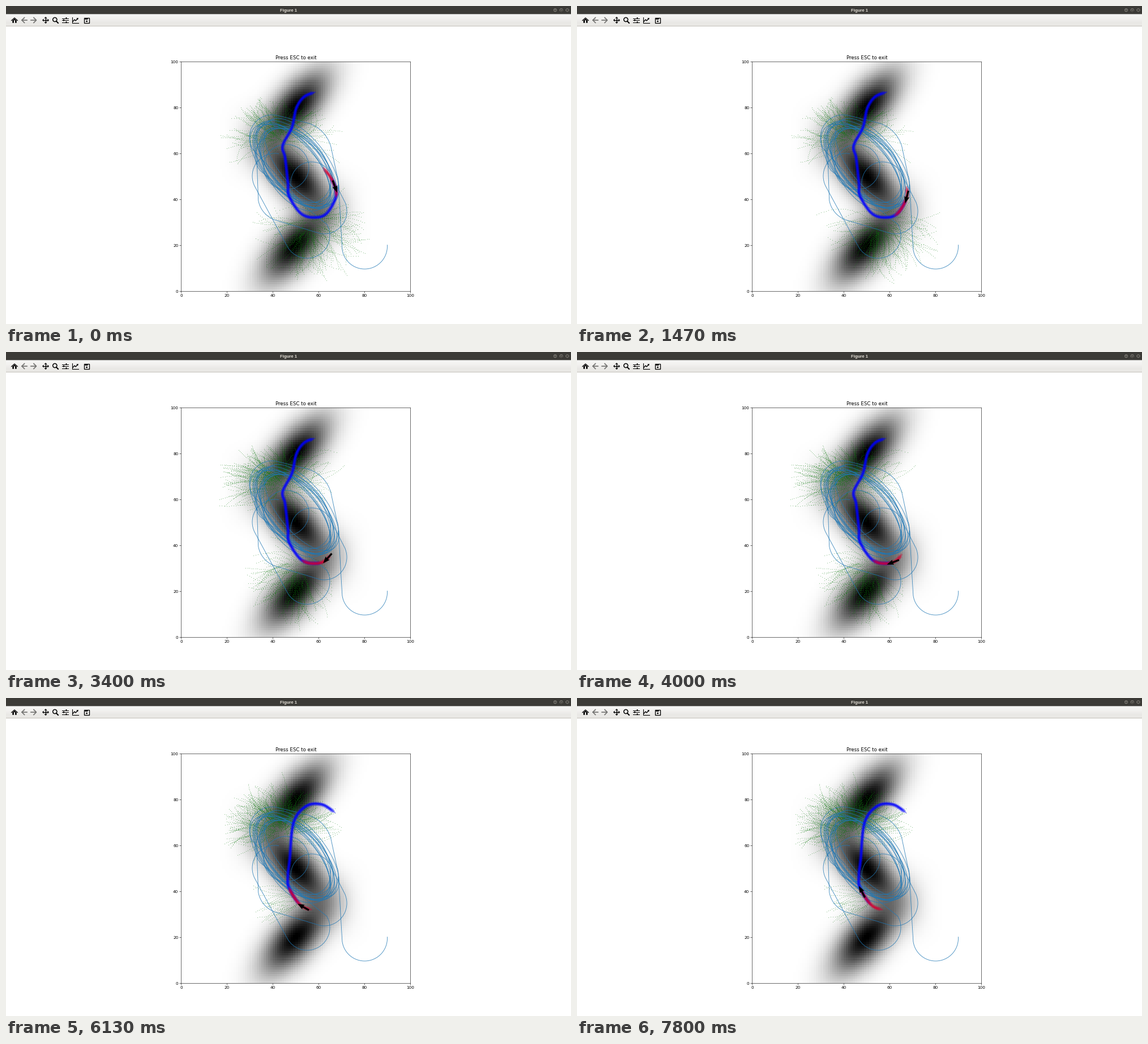
Write a matplotlib script that moves like this. It is 998 px wide and 561 px high and loops after 8000 ms.

```python
import numpy as np
import matplotlib.pyplot as plt
from matplotlib.animation import FuncAnimation
from matplotlib.collections import LineCollection, PolyCollection
from matplotlib.patches import Circle, Polygon, Rectangle

W, H, DPI = 998, 561, 64
PX = 72 / DPI            # points per pixel
K = 0.812                # scale of the default plot sizes
FRAMES, STEP = 125, 64   # one loop of 8000 ms
R = 40                   # turning radius in pixels

plt.rcParams.update({
    "font.family": "DejaVu Sans", "font.size": 10 * K, "axes.linewidth": 0.8 * K,
    "axes.titlepad": 6 * K, "toolbar": "None",
    **{f"{a}tick.major.{k}": v * K for a in "xy"
       for k, v in (("size", 3.5), ("pad", 3.5), ("width", 0.8))},
})
fig = plt.figure(figsize=(W / DPI, H / DPI), dpi=DPI, facecolor="white")
rng = np.random.default_rng(4)


# ---------- curves, in stage pixels with y down ----------
def arc(cx, cy, a0, a1, rx=R, ry=None, tilt=0):
    a = np.radians(np.linspace(a0, a1, 60))
    u, v = rx * np.cos(a), (ry or rx) * np.sin(a)
    c, s = np.cos(np.radians(tilt)), np.sin(np.radians(tilt))
    return np.column_stack([cx + c * u - s * v, cy + s * u + c * v])


def smooth(pts):
    """Catmull-Rom curve, resampled to one point per pixel of length."""
    p = np.array(pts, float)
    p = np.vstack([2 * p[0] - p[1], p, 2 * p[-1] - p[-2]])
    t = np.linspace(0, 1, 20, endpoint=False)[:, None]
    out = np.vstack([
        0.5 * (2 * b + (c - a) * t + (2 * a - 5 * b + 4 * c - d) * t**2
               + (3 * b - a - 3 * c + d) * t**3)
        for a, b, c, d in zip(p, p[1:], p[2:], p[3:])])
    s = np.r_[0, np.cumsum(np.hypot(*np.diff(out, axis=0).T))]
    q = np.arange(0, s[-1])
    return np.column_stack([np.interp(q, s, col) for col in out.T])


def dart(size, tip, wide, shaft):
    """Arrow outline along +x, centred on its middle."""
    half = np.array([(-size, shaft), (size - tip, shaft), (size - tip - 1, wide), (size, 0)])
    return np.vstack([half, half[-2::-1] * (1, -1)])


def turned(shape, at, way):
    u = way / np.hypot(*way)
    return at + np.outer(shape[:, 0], u) + np.outer(shape[:, 1], [-u[1], u[0]])


# ---------- density map ----------
ax = fig.add_axes([309.4 / W, 1 - 503.2 / H, 405 / W, 405 / H])
X, Y = np.meshgrid(*[np.arange(100) + 0.5] * 2)


def bump(cy, slant):
    """Gaussian ridge centred at x = 50, tilted by the sign of slant."""
    dx, dy = X - 50, slant * (Y - cy)
    along, across = (0.66 * dx + 0.75 * dy) / 13.2, (0.75 * dx - 0.66 * dy) / 6
    return np.exp(-0.5 * (along**2 + across**2))


heat = 1 - (1 - bump(80, 1)) * (1 - bump(50, -1)) * (1 - bump(20, 1))
ax.imshow(heat, cmap="gray_r", vmin=0, vmax=1, origin="lower",
          extent=(0, 100, 0, 100), interpolation="nearest", aspect="auto")
ax.set(xlim=(0, 100), ylim=(0, 100), xticks=range(0, 101, 20), yticks=range(0, 101, 20))
ax.set_title("Press ESC to exit")

# ---------- window ----------
ui = fig.add_axes([0, 0, 1, 1])
ui.imshow([[(0.96, 0.957, 0.95)], [(0.915, 0.91, 0.9)]], interpolation="bilinear",
          extent=(0, W, 34.5, 14), aspect="auto")
ui.set(xlim=(0, W), ylim=(H, 0))
ui.axis("off")


def line(x, y, color="black", w=1.4, z=3):
    ui.plot(x, y, color=color, lw=w * PX, zorder=z)


def box(x, y, w, h, color="black"):
    ui.add_patch(Rectangle((x, y), w, h, fc=color, ec="none", zorder=3, snap=False))


def ring(x, y, r, fc, ec, w):
    ui.add_patch(Circle((x, y), r, fc=fc, ec=ec, lw=w * PX, zorder=4))


def head(x, y, dx, dy, r=2.6):
    """Small triangle pointing along (dx, dy)."""
    pts = [(x + r * dx, y + r * dy), (x + r * dy, y - r * dx), (x - r * dy, y + r * dx)]
    ui.add_patch(Polygon(pts, fc="black", ec="none", zorder=3))


box(0, 0, W, 14.3, "#3c3b37")
line([0, W], [34.5, 34.5], "#c4c1bb", 1)
ui.text(499, 7.2, "Figure 1", color="#dfdbd2", family="Liberation Sans", weight="bold",
        size=7.7 * PX, ha="center", va="center_baseline", zorder=4)
INK = "#33322e"
for x in (970, 980.8, 991.5):
    ring(x, 7.2, 3.9, "#6a6862", "#2c2b28", 0.7)
line([968.5, 971.5], [7.2, 7.2], INK, 0.9, 5)
ui.add_patch(Rectangle((979.4, 5.8), 2.8, 2.8, fc="none", ec=INK, lw=0.8 * PX, zorder=5))
for s in (1, -1):
    line([990, 993], [7.2 - 1.5 * s, 7.2 + 1.5 * s], INK, 0.9, 5)

# home
line([9.6, 15, 20.4], [25.6, 20.9, 25.6], w=1.2)
head(15, 25.2, 0, -1, 3.2)
box(11.3, 25, 2.6, 4.8)
box(16.1, 25, 2.6, 4.8)
# back and forward
for x, s in ((32.5, 1), (49, -1)):
    line([x - 4 * s, x + 5 * s], [25, 25], "#747472", 1.7)
    line([x, x - 4.5 * s, x], [20.5, 25, 29.5], "#747472", 1.7)
# pan
for dx, dy in ((1, 0), (-1, 0), (0, 1), (0, -1)):
    line([70, 70 + 4 * dx], [25, 25 + 4 * dy])
    head(70 + 3.4 * dx, 25 + 3.4 * dy, dx, dy)
# zoom
ring(86.3, 24, 3.6, "none", "black", 1.5)
line([89, 92], [27, 30], w=2)
# sliders
for k, x in enumerate((106.5, 102, 106.5)):
    y = 21.5 + 3.6 * k
    line([99, 110], [y, y], w=1)
    box(x - 0.9, y - 1.5, 1.8, 3)
# curve editor
line([116.6, 116.6, 128], [20, 29.6, 29.6], w=1.1)
line([118.5, 121, 123, 127], [27, 24, 26, 21.8])
head(125.7, 23, 0.7, -0.7, 2.2)
# save
ui.add_patch(Rectangle((138, 20.6), 9.2, 9, fc="none", ec="black", lw=1.3 * PX, zorder=3))
box(139.5, 21.5, 5, 2.4)
ring(142.6, 26.9, 1.4, "black", "none", 0)

# ---------- travelled track: arcs joined by straight runs ----------
track = [
    np.vstack([arc(633.5, 424, -4, 172), arc(547, 312, 0, -20), arc(516, 264, -15, -75, 60),
               arc(470, 232, -75, -210), arc(547, 315, 130, 0)]),
    np.vstack([arc(475, 300, -80, -207), arc(532, 405, 153, -30), arc(480, 265, 140, 240)]),
    np.vstack([arc(540, 312, 170, 340, 37), arc(562, 362, -30, 100),
               arc(490, 335, 110, 170, 45), arc(480, 240, 160, 260)]),
    arc(495, 284, 0, 360),
]
for _ in range(10):
    cx, cy = rng.normal((511, 282), (5, 4))
    track.append(arc(cx, cy, 0, 360, rng.uniform(74, 93), rng.uniform(40, 52),
                     rng.uniform(44, 56)))
ui.add_collection(LineCollection(track, colors="#1f77b4", linewidths=0.85 * PX,
                                 alpha=0.85, zorder=5))


# ---------- search trees ----------
def fan(cx, cy, rx, ry, mean, spread, n):
    """Dotted trails that curl outward to an elliptic edge."""
    out = []
    for a in np.radians(rng.normal(mean, spread, n)):
        s = np.arange(0.15, rng.uniform(0.6, 1), 3.5 / max(rx, ry))
        b = a + rng.normal(0, 0.6) * (1 - s)
        jx, jy = rng.normal(0, 8, 2)
        out.append(np.column_stack([cx + jx + rx * s * np.cos(b), cy + jy + ry * s * np.sin(b)]))
    return np.vstack(out)


upper = fan(487, 232, 105, 70, 245, 65, 130)
trees = [
    np.vstack([upper, fan(538, 385, 105, 97, 75, 65, 130)]),
    np.vstack([upper, fan(538, 385, 108, 97, 85, 55, 115)]),
    np.vstack([fan(487, 232, 108, 72, 250, 65, 180), fan(520, 385, 100, 95, 120, 45, 100)]),
    np.vstack([fan(487, 232, 112, 78, 255, 60, 230), fan(510, 360, 84, 66, 160, 25, 20)]),
]

# ---------- planned routes ----------
stem = [(562, 287), (577, 309), (583, 335), (566, 366), (543, 373), (520, 365),
        (500, 335), (498, 312)]
route = smooth(stem + [(493, 268), (489, 246), (505, 214), (513, 180), (527, 160), (549, 151)])
swerve = smooth(stem + [(501, 285), (508, 220), (530, 191), (558, 188), (584, 204)])
heading = np.gradient(route, axis=0)
SMALL, ARROW = dart(7, 9, 4.2, 1.7), dart(11.5, 11, 4.6, 1.6)
ADVANCE, DONE = 40, 53        # route pixels per plan, and pixels marked as committed
CYCLE, LEAD = 2400, 1470      # ms per plan, and its age when the loop begins


def darts(path, i, j, color, z):
    way = np.gradient(path, axis=0)
    polys = [turned(SMALL, path[k], way[k]) for k in range(i, j, 3)]
    return ui.add_collection(PolyCollection(polys, facecolors=color, edgecolors="none",
                                            alpha=0.36, zorder=z))


plans = []
for k, tree in enumerate(trees):
    path, i = swerve if k == 3 else route, ADVANCE * k
    dots, = ui.plot(*tree.T, "o", color="#0a7a0a", ms=1.15 * PX, mew=0, alpha=0.48, zorder=4)
    plans.append((dots, darts(path, i + DONE // 2, len(path) - 5, "#0000ff", 6),
                  darts(path, i + 4, i + DONE, "#d40030", 7)))
robot = ui.add_patch(Polygon(ARROW, fc="black", ec="none", zorder=8))


def draw(i):
    now, age = divmod(i * STEP + LEAD, CYCLE)
    for k, plan in enumerate(plans):
        for part in plan:
            part.set_visible(k == now)
    p = int(ADVANCE * now + 6 + 51 * min(age / CYCLE, 0.87))
    robot.set_xy(turned(ARROW, route[p], heading[p]))
    return [robot]


def reset():
    return draw(0)


anim = FuncAnimation(fig, draw, frames=FRAMES, init_func=reset, interval=STEP,
                     repeat=True, repeat_delay=0, blit=False)
plt.show()
```
